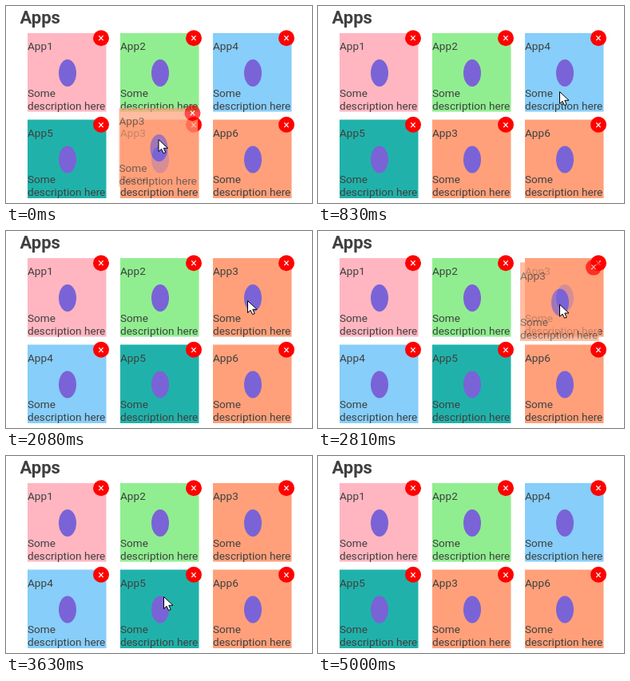
An HTML page that plays this animation: 383x247 px, repeating every 5.27 s.

```html
<!DOCTYPE html>
<html lang="en">
<head>
<meta charset="utf-8">
<title>Apps</title>
<style>
  html, body { margin: 0; width: 100%; height: 100%; overflow: hidden; background: #fff; }
  svg { display: block; font: 13.6px Roboto, sans-serif; fill: #404040; }
  .title { font-weight: 700; font-size: 22px; }
  .close { font-size: 14px; fill: #fff; text-anchor: middle; }
</style>
</head>
<body>
<svg width="383" height="247" viewBox="0 0 383 247">
  <text class="title" x="17.5" y="22">Apps</text>
  <g id="grid"></g>
  <g id="ghost" opacity=".7"></g>
  <path id="cursor" d="M.5 .5V15.5L4 12.3L6.6 17.6L9.2 16.5L6.8 11.3H12Z" fill="#fff" stroke="#000"/>
</svg>
<script>
const LOOP = 5270, BEAT = 135;
const DROP = 830, SWAP = 1510, GRAB = 2660, DROP_BACK = 3630, SWAP_BACK = 4340, LEAVE = 5000;
const colors = ['lightpink', 'lightgreen', 'lightsalmon', 'lightskyblue', 'lightseagreen', 'lightsalmon'];
const mixed = [1, 2, 4, 5, 3, 6], sorted = [1, 2, 3, 4, 5, 6];

const $ = id => document.getElementById(id);
const grid = $('grid'), ghost = $('ghost'), cursor = $('cursor');

const linear = u => u;
const easeIn = u => u * u;
const easeOut = u => 1 - (1 - u) ** 3;
const easeInOut = u => u < .5 ? 4 * u ** 3 : 1 - 4 * (1 - u) ** 3;
const sineInOut = u => (1 - Math.cos(Math.PI * u)) / 2;
const mix = (a, b, p) => a + (b - a) * p;
const tween = (t, start, end, a, b, ease) =>
  mix(a, b, ease(Math.min(Math.max((t - start) / (end - start), 0), 1)));

const face = id => `
  <rect width="98.5" height="98.5" fill="${colors[id - 1]}"/>
  <text y="21.4">App${id}</text>
  <ellipse cx="50" cy="50" rx="11" ry="17" fill="#7a63d6"/>
  <text y="79.6">Some</text>
  <text y="95.7">description here</text>
  <circle cx="92" cy="6.2" r="10" fill="red"/>
  <text class="close" x="92" y="11">×</text>`;

const cards = sorted.map(id => {
  const g = document.createElementNS('http://www.w3.org/2000/svg', 'g');
  g.innerHTML = '<rect x="-5" y="-5" width="108.5" height="108.5" fill="#fff"/>' + face(id);
  return grid.appendChild(g);
});
ghost.innerHTML = face(3);

function place(el, pos) {
  el.style.display = pos ? '' : 'none';
  if (pos) el.setAttribute('transform', `translate(${pos})`);
}

const cell = i => [27 + 116 * (i % 3), 34 + 108.5 * Math.floor(i / 3)];

// Cards glide to their new cells while old and new views cross-fade.
function layout(from, to, p) {
  for (let i = 5; i >= 0; i--) {
    const id = to[i], card = cards[id - 1];
    const start = cell(from.indexOf(id)), end = cell(i);
    place(card, start.map((a, k) => mix(a, end[k], p)));
    if (i > 1) {
      card.setAttribute('opacity', 1 - p * (1 - p));
      grid.append(card);
    }
  }
}

const dragOut = t => [
  tween(t, 270, 800, 141.5, 244, easeOut),
  tween(t, 0, 560, 128, 42, easeOut)
];
const dragBack = t => [
  tween(t, 2930, 3470, 253, 148, easeIn),
  tween(t, GRAB, 3300, 36, 127, easeInOut)
];
// The pointer runs slightly ahead of the card it holds.
const held = (path, t) => path(t + 25).map((v, k) => v + 49 + k);

function pointer(t, s) {
  if (t < DROP) return held(dragOut, s);
  if (t < GRAB) return [302, tween(s, 1810, 2050, 107, 87, easeOut)];
  if (t < DROP_BACK) return held(dragBack, s);
  if (t < LEAVE) return [
    tween(s, 4640, 4850, 197, 357, linear),
    tween(s, 4640, 4850, 176, 241, linear)
  ];
}

function draw(t) {
  // Each gesture advances in beats counted from its start.
  const begin = [0, SWAP, GRAB, SWAP_BACK].findLast(b => b <= t);
  const s = begin + Math.floor((t - begin) / BEAT) * BEAT;
  const progress = start => tween(s, start - 66, start + 184, 0, 1, sineInOut);

  if (t < SWAP) layout(mixed, mixed, 1);
  else if (t < SWAP_BACK) layout(mixed, sorted, progress(SWAP));
  else layout(sorted, mixed, progress(SWAP_BACK));

  place(ghost, t < DROP ? dragOut(s) : t >= GRAB && t < DROP_BACK ? dragBack(s) : null);
  place(cursor, pointer(t, s));
}

const start = performance.now();
function tick() {
  draw((performance.now() - start) % LOOP);
  requestAnimationFrame(tick);
}
tick();
</script>
</body>
</html>
```
